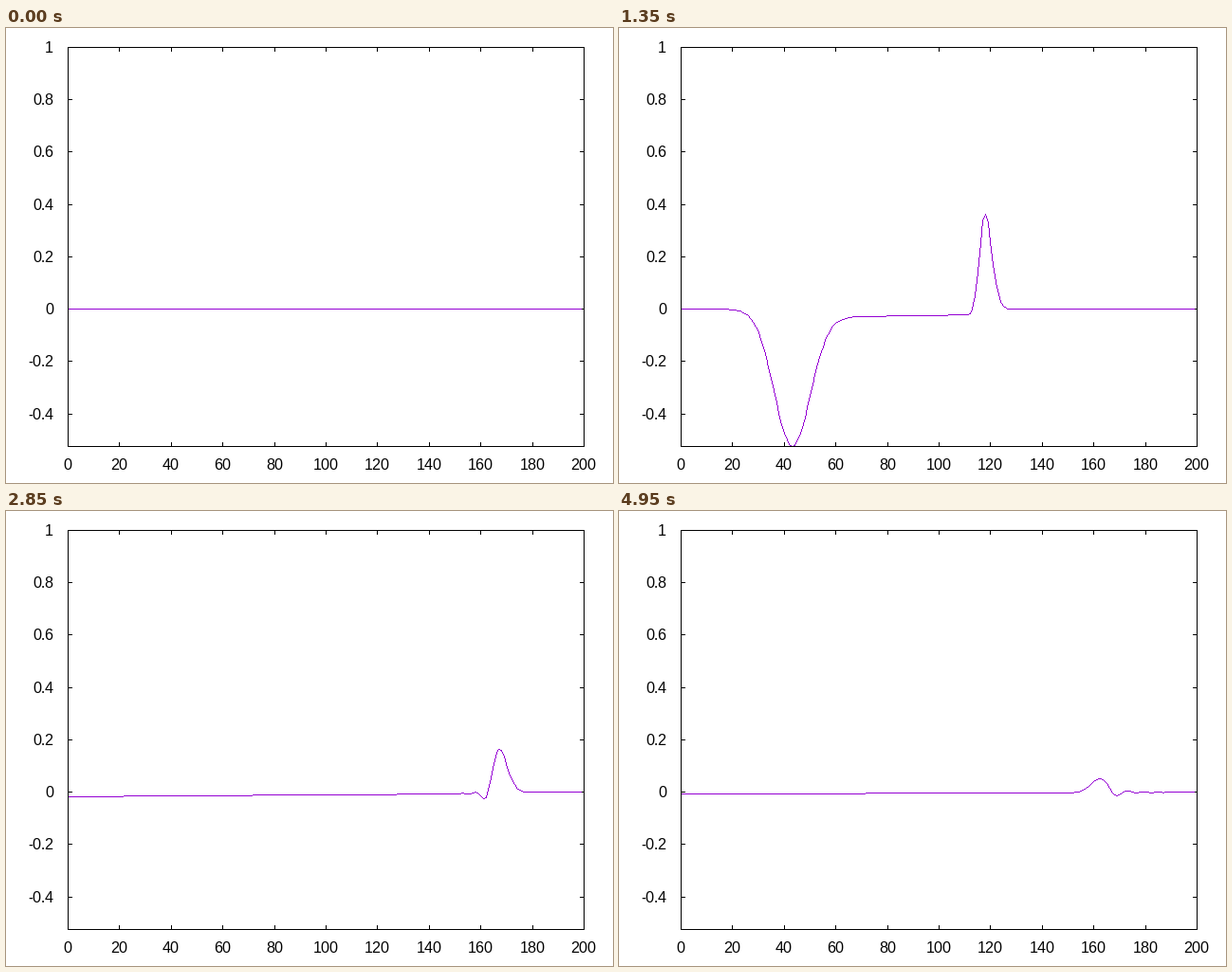
Animation, 640 px wide and 480 px high, one loop 5 s. Source, as a matplotlib script:

```python
"""A pulse crosses a 1D FDTD grid and meets a lossy dielectric half-space."""
import numpy as np
import matplotlib.pyplot as plt
from matplotlib.animation import FuncAnimation

WIDTH, HEIGHT, DPI = 640, 480, 100
PX = 72 / DPI                                  # one pixel in points
LEFT, RIGHT, TOP, BOTTOM = 65, 609, 20, 441
Y_MIN, Y_MAX = -0.5245, 1.0
TICK = 4

SIZE, SOURCE, INTERFACE = 200, 50, 100
EPS_R, LOSS = 9.0, 0.005
FRAMES, STEPS = 100, 5

plt.rcParams["font.family"] = "Liberation Sans"
plt.rcParams["text.hinting"] = "default"
plt.rcParams["text.hinting_factor"] = 1


def pulse(t):
    return np.exp(-(t - 30) ** 2 / 100)


def simulate():
    """Return the electric field at every frame; h is scaled by the impedance."""
    e, h = np.zeros(SIZE), np.zeros(SIZE)
    keep, gain = np.ones(SIZE), np.ones(SIZE)
    keep[INTERFACE:] = (1 - LOSS) / (1 + LOSS)
    gain[INTERFACE:] = 1 / EPS_R / (1 + LOSS)
    history = []
    for q in range(FRAMES * STEPS):
        h[:-1] += e[1:] - e[:-1]
        h[SOURCE - 1] -= pulse(q)
        e[0] = e[1]                            # absorbing left end
        e[1:] = keep[1:] * e[1:] + gain[1:] * (h[1:] - h[:-1])
        e[SOURCE] += pulse(q + 1)
        if q % STEPS == 0:
            history.append(e.copy())
    return history


def to_col(x):
    x = np.asarray(x)
    return np.floor(LEFT + (RIGHT - LEFT) * x / SIZE + 0.5).astype(int)


def to_row(y):
    up = (np.asarray(y) - Y_MIN) / (Y_MAX - Y_MIN) * (BOTTOM - TOP)
    return BOTTOM - np.floor(np.clip(up, 0, BOTTOM - TOP) + 0.5).astype(int)


def segment(x0, y0, x1, y1):
    """Pixels of a Bresenham line, walked along its longer direction."""
    n = max(abs(x1 - x0), abs(y1 - y0))
    if abs(y1 - y0) > abs(x1 - x0) and y1 < y0:
        x0, y0, x1, y1 = x1, y1, x0, y0
    k = np.arange(n + 1)

    def walk(a, b):
        return a + np.sign(b - a) * ((2 * abs(b - a) * k + n) // (2 * n))

    return walk(x0, x1), walk(y0, y1)


def trace(field):
    """Upper and lower edge of the one-pixel curve in every pixel column."""
    rows = to_row(field)
    parts = [segment(*p) for p in zip(cols[:-1], rows[:-1], cols[1:], rows[1:])]
    x = np.concatenate([p[0] for p in parts]) - LEFT
    y = np.concatenate([p[1] for p in parts])
    upper = np.full(x.max() + 1, HEIGHT)
    lower = np.zeros(x.max() + 1, int)
    np.minimum.at(upper, x, y)
    np.maximum.at(lower, x, y + 1)
    return upper, lower


fig = plt.figure(figsize=(WIDTH / DPI, HEIGHT / DPI), dpi=DPI, facecolor="white")
ax = fig.add_axes([0, 0, 1, 1])


def bar(x0, y0, x1, y1, z=1):
    """Black block covering the pixels from one corner to the other."""
    ax.add_patch(plt.Rectangle((x0, y0), x1 - x0 + 1, y1 - y0 + 1, fc="black",
                               lw=0, antialiased=False, snap=False, zorder=z))


def label(x, y, text, align):
    ax.text(x, y, text, ha=align, va="baseline", fontsize=16 * PX, color="black")


for value in range(0, SIZE + 1, 20):
    col = int(to_col(value))
    bar(col, BOTTOM - TICK, col, BOTTOM)
    bar(col, TOP, col, TOP + TICK)
    label(col, 466, str(value), "center")

for i in range(-2, 6):
    row = int(to_row(i / 5))
    bar(LEFT, row, LEFT + TICK, row)
    bar(RIGHT - TICK, row, RIGHT, row)
    label(50, row + 6, f"{i / 5:g}", "right")

for y in (TOP, BOTTOM):
    bar(LEFT, y, RIGHT, y, z=3)
for x in (LEFT, RIGHT):
    bar(x, TOP, x, BOTTOM, z=3)

cols = to_col(np.arange(SIZE))
traces = [trace(field) for field in simulate()]
upper, lower = traces[0]
curve = ax.stairs(upper, LEFT + np.arange(len(upper) + 1), baseline=lower,
                  fill=True, color="#9400d3", lw=0, antialiased=False,
                  snap=False, zorder=2)

ax.set_xlim(0, WIDTH)
ax.set_ylim(HEIGHT, 0)
ax.axis("off")


def draw(n):
    upper, lower = traces[n]
    curve.set_data(values=upper, baseline=lower)
    return (curve,)


anim = FuncAnimation(fig, draw, frames=FRAMES, interval=50, repeat=True,
                     repeat_delay=0)
plt.show()
```
